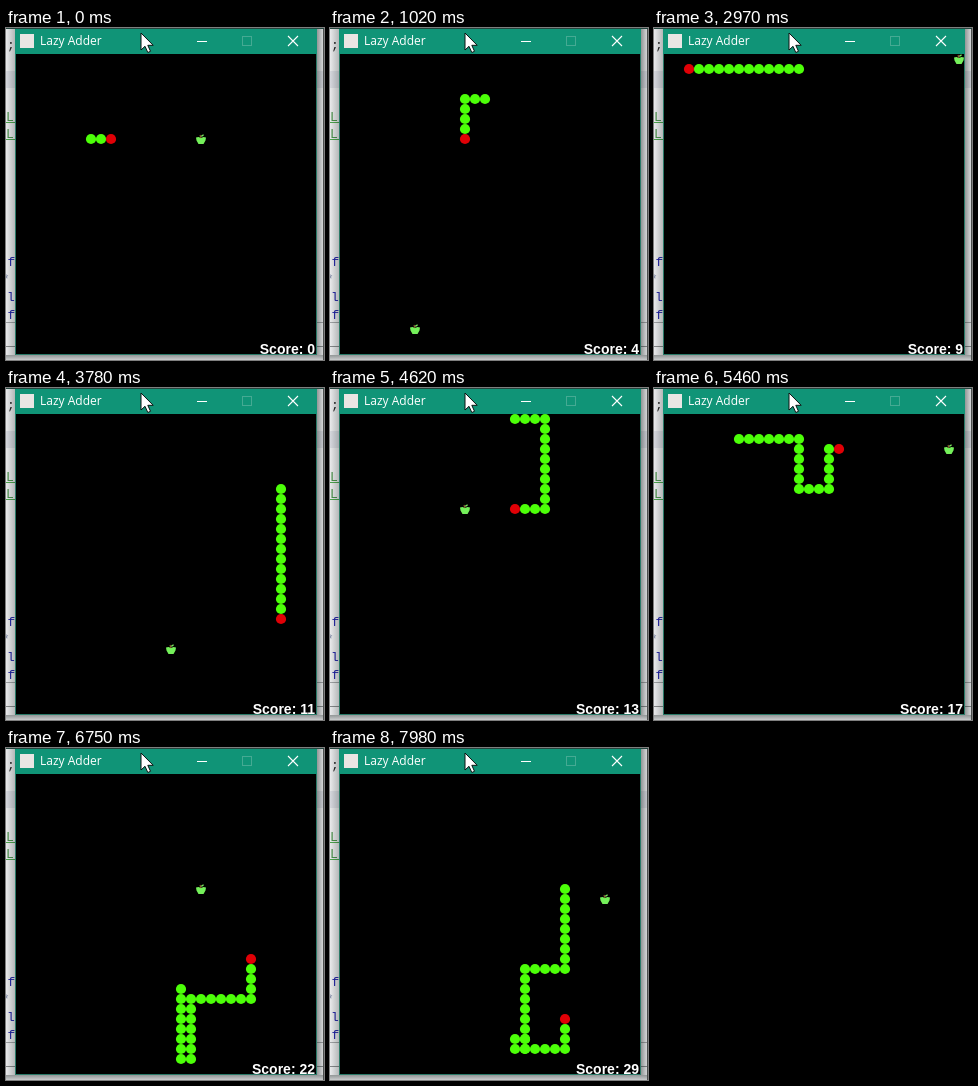
Animation, 318 px wide and 332 px high, one loop 8000 ms. Source, as an HTML page with a canvas:

```html
<!DOCTYPE html>
<html lang="en">
<head>
<meta charset="utf-8">
<title>Lazy Adder</title>
<style>
  html, body { margin: 0; width: 100%; height: 100%; overflow: hidden; background: #000; }
  canvas { display: block; }
</style>
</head>
<body>
<canvas id="stage" width="318" height="332"></canvas>
<script>
const LOOP = 8000, FRAME = 30, MOVES_PER_FRAME = 1.9224;
const CELL = 10, LEFT = 10, TOP = 26, SIZE = 300;

// Grid cells of the apples, in the order they are eaten.
const apples = [
  [18, 8], [1, 5], [19, 1], [12, 4], [7, 27], [14, 14], [24, 3], [25, 20],
  [2, 1], [29, 0], [26, 5], [15, 23], [20, 0], [12, 9], [5, 16], [13, 2],
  [16, 7], [28, 3], [7, 7], [16, 11], [17, 28], [23, 22], [18, 11], [12, 6],
  [22, 1], [18, 19], [18, 27], [17, 26], [22, 27], [26, 12]
];

const trail = [[7, 8], [8, 8], [9, 8]];
const eatenAt = [];

// The snake steers vertically first, then sideways, and never reverses.
function plotTrail() {
  let [x, y] = trail[2];
  let heading = 0;
  for (const [ax, ay] of apples) {
    while (x !== ax || y !== ay) {
      const dy = Math.sign(ay - y);
      if (dy && dy !== -heading) {
        y += dy;
        heading = dy;
      } else {
        x += Math.sign(ax - x) || 1;
        heading = 0;
      }
      trail.push([x, y]);
    }
    eatenAt.push(trail.length - 3);
  }
}

const ctx = document.getElementById('stage').getContext('2d');

function rect(color, x, y, w, h) {
  ctx.fillStyle = color;
  ctx.fillRect(x, y, w, h);
}

function text(str, x, y, font, color, align = 'left') {
  ctx.font = font;
  ctx.fillStyle = color;
  ctx.textAlign = align;
  ctx.fillText(str, x, y);
}

function stroke(color, width, ...lines) {
  ctx.strokeStyle = color;
  ctx.lineWidth = width;
  ctx.beginPath();
  for (const [x1, y1, x2, y2] of lines) {
    ctx.moveTo(x1, y1);
    ctx.lineTo(x2, y2);
  }
  ctx.stroke();
}

function disc(color, x, y, r) {
  ctx.fillStyle = color;
  ctx.beginPath();
  ctx.arc(x, y, r, 0, Math.PI * 2);
  ctx.fill();
}

// Darkens a strip from the window edge (x1, y1) outwards to (x2, y2).
function shadow(strength, [x1, y1, x2, y2], box) {
  const fade = ctx.createLinearGradient(x1, y1, x2, y2);
  fade.addColorStop(0, `rgba(20, 30, 28, ${strength})`);
  fade.addColorStop(1, `rgba(20, 30, 28, ${strength / 4})`);
  rect(fade, ...box);
}

const centre = ([col, row]) => [LEFT + (col + 0.5) * CELL, TOP + (row + 0.5) * CELL];

function drawEditor() {
  const mono = '13px "Liberation Mono", monospace';
  rect('#fafafc', 0, 0, 318, 332);
  rect('#e6e7ee', 0, 43, 318, 17);
  rect('#a9abae', 0, 294, 318, 1);
  rect('#8d8f92', 0, 318, 318, 1);
  text(';', 1, 21, mono, '#222');
  for (const y of [93, 110]) {
    text('L', 0, y, mono, '#4d9a4d');
    rect('#4fae4f', 0, y + 1, 9, 1);
  }
  text('f', 1.5, 238, mono, '#2020b0');
  text('*', -4, 255, mono, '#7a86a8');
  text('l', 1, 273, mono, '#2020b0');
  text('f', 1.5, 291, mono, '#2020b0');
  shadow(0.3, [9, 0, 0, 0], [0, 0, 9, 327]);
  shadow(0.45, [311, 0, 318, 0], [311, 0, 7, 327]);
  shadow(0.45, [0, 327, 0, 334], [0, 327, 318, 5]);
  rect('#4a4d4c', 317, 0, 1, 332);
}

function drawWindow() {
  rect('#2a7a68', 9, 0, 302, 327);
  rect('#109477', 9, 0, 302, 26);
  rect('#24443d', 0, 0, 318, 1);
  rect('#e9e6e4', 14, 6, 14, 14);
  text('Lazy Adder', 34, 17, '12px "Open Sans", sans-serif', '#fff');
  stroke('#fff', 1, [191, 13.5, 201, 13.5]);
  ctx.strokeStyle = '#45aa93';
  ctx.strokeRect(236.5, 8.5, 9, 9);
  stroke('#fff', 1.1, [282, 8, 292, 18], [292, 8, 282, 18]);
}

function drawCursor() {
  const shape = new Path2D('M135 5v17l4-3.7 2.8 6.2 2.7-1.2-2.7-6h5.4z');
  ctx.fillStyle = '#fff';
  ctx.fill(shape);
  ctx.strokeStyle = '#0a1412';
  ctx.lineWidth = 1;
  ctx.stroke(shape);
}

function drawApple(cell) {
  const [x, y] = centre(cell);
  ctx.save();
  ctx.translate(x, y);
  ctx.fillStyle = '#74f05a';
  ctx.fill(new Path2D('M-5-1.5L-2.5-2 0-1 2.5-2 5-1.5 4.5 1.5 2.5 5H-2.5L-4.5 1.5z'));
  stroke('#8a5a32', 1.2, [0, -1, -1, -4]);
  stroke('#7ce35e', 1.4, [0.3, -2.6, 2.6, -4.2]);
  ctx.restore();
}

function drawGame(move) {
  const score = eatenAt.filter(at => at <= move).length;
  const head = move + 2;
  rect('#000', LEFT, TOP, SIZE, SIZE);
  drawApple(apples[score]);
  for (let i = head - score - 2; i < head; i++) disc('#4cff08', ...centre(trail[i]), 5.1);
  disc('#e00006', ...centre(trail[head]), 5.1);
  text('Score: ' + score, 309, 326, 'bold 14px "Liberation Sans", sans-serif', '#fff', 'right');
}

function draw() {
  const tick = Math.floor(performance.now() % LOOP / FRAME);
  drawEditor();
  drawWindow();
  drawGame(Math.max(0, Math.floor(tick * MOVES_PER_FRAME - 0.3)));
  drawCursor();
  requestAnimationFrame(draw);
}

plotTrail();
draw();
</script>
</body>
</html>
```
